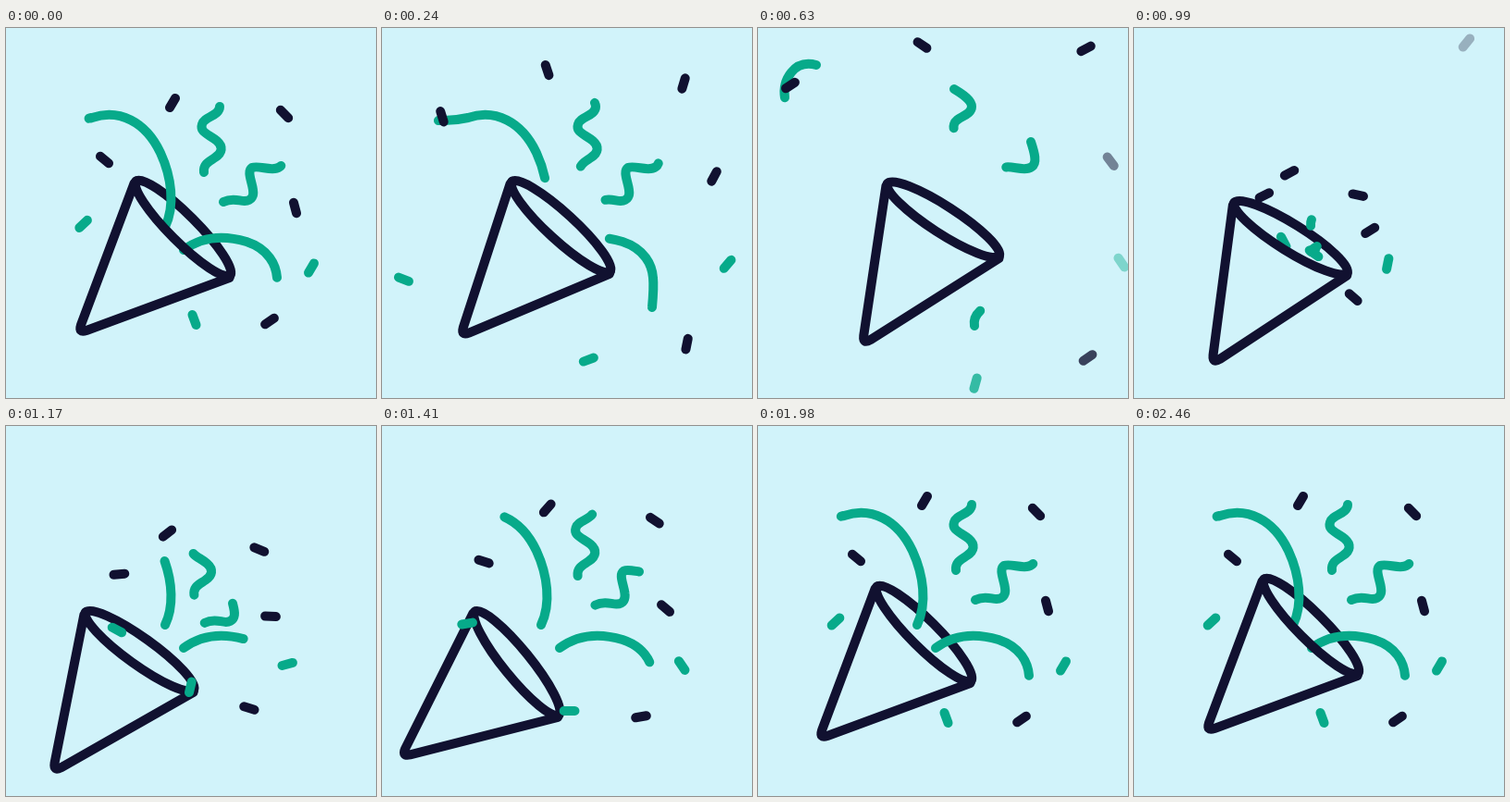
An HTML page with a canvas for the animation above (2490 ms loop, 400 by 400 pixels).

```html
<!DOCTYPE html>
<html lang="en">
<head>
<meta charset="utf-8">
<title>Party popper</title>
<style>
  html, body { margin: 0; width: 100%; height: 100%; overflow: hidden; background: #d1f3fa; }
  canvas { display: block; }
</style>
</head>
<body>
<canvas id="stage" width="400" height="400"></canvas>
<script>
const LOOP = 2490;
const BG = '#d1f3fa', NAVY = '#111130', GREEN = '#07aa8a';
const ctx = document.getElementById('stage').getContext('2d');
ctx.lineCap = ctx.lineJoin = 'round';
ctx.lineWidth = 10;

const clamp = v => Math.min(1, Math.max(0, v));
const cubicOut = u => 1 - (1 - clamp(u)) ** 3;
const rad = deg => deg * Math.PI / 180;

// Monotone cubic interpolation through [time, value] pairs
function track(times, values) {
  const n = times.length - 1;
  const slope = i => (values[i + 1] - values[i]) / (times[i + 1] - times[i]);
  const tangent = i => {
    if (i === 0 || i === n) return 0;
    const a = slope(i - 1), b = slope(i);
    return a * b <= 0 ? 0 : 2 * a * b / (a + b);
  };
  return t => {
    let i = 0;
    while (i < n - 1 && t >= times[i + 1]) i++;
    const h = times[i + 1] - times[i], u = clamp((t - times[i]) / h), w = 1 - u;
    return w * w * (1 + 2 * u) * values[i] + u * u * (3 - 2 * u) * values[i + 1]
      + h * u * w * (w * tangent(i) - u * tangent(i + 1));
  };
}

// Cone: swings back, recoils when it fires, then settles
const keys = [0, 240, 630, 885, 990, 1080, 1410, 1635, 1980, 2160, 2460];
const coneX = track(keys, [0, 4.5, 21.5, 23, -8, -28, -51, -39.6, -12, -6, 0]);
const coneY = track(keys, [0, 0.5, 1, 1, 21, 35, 34, 26.4, 8, 4, 0]);
const coneTurn = track(keys, [0, -2.5, -12.1, -13.1, -13.1, -13, 6, 3.5, 0, 0, 0]);
const backRim = new Path2D('M140.6 165.6A72 15 45 0 1 242.4 267.4');
const coneFront = new Path2D(
  'M242.4 267.4A72 15 45 0 1 140.6 165.6L138.5 168L81 321Q78 330 87 327L241.5 270Z');

function drawCone(shape, t) {
  ctx.save();
  ctx.translate(137 + coneX(t), 271 + coneY(t));
  ctx.rotate(rad(coneTurn(t)));
  ctx.translate(-137, -271);
  ctx.strokeStyle = NAVY;
  ctx.stroke(shape);
  ctx.restore();
}

// Confetti: resting pose, flight (dx, dy, spin, end time), burst offset (bx, by, spin)
const confetti = [
  [NAVY, 180, 81, -59, -2.6, -64.5, -90, 900, -12, 76, 31],
  [NAVY, 301, 93, 45, 58.4, -77, -276, 1062, -59, 88, -33],
  [NAVY, 106.5, 142.5, 40, -73.4, -82.6, -260, 880, 34.5, 38.5, -67],
  [NAVY, 312.5, 194.5, 75, 69, -50.5, -203, 750, -57.5, 24.5, -107],
  [NAVY, 285, 317, -34, 72.5, 40, -365, 820, -48, -26, 75],
  [GREEN, 84, 211.5, -43, -78.5, 78, -150, 620, 78, 19.5, 105],
  [GREEN, 330, 259.5, -60, 63, -6, -245, 730, -56, -4.5, -199],
  [GREEN, 203.5, 315.5, 70, 32, 69.5, -146, 815, -9, -72, -216],
];

function drawPiece(color, x, y, deg, alpha = 1) {
  const c = 5.9 * Math.cos(rad(deg)), s = 5.9 * Math.sin(rad(deg));
  ctx.globalAlpha = alpha;
  ctx.strokeStyle = color;
  ctx.beginPath();
  ctx.moveTo(x - c, y - s);
  ctx.lineTo(x + c, y + s);
  ctx.stroke();
  ctx.globalAlpha = 1;
}

// Share of the burst offset that is left; 1 at 990 ms
const burstLeft = t => Math.max(0, (1785 - t) / 795);

function drawConfetti(t) {
  for (const [color, x, y, deg, dx, dy, spin, end, bx, by, bSpin] of confetti) {
    if (t < end) {
      const start = Math.max(0, (end - 700) / 5);
      const e = cubicOut((t - start) / (end - start));
      drawPiece(color, x + dx * e, y + dy * e, deg + spin * e, clamp((end - t) / 240));
    }
    if (t >= 915) {
      const left = burstLeft(t), out = clamp((t - 900) / 90);
      const px = x + bx * left ** 3, py = y + by * left ** 3;
      drawPiece(color, 180 + (px - 180) * out, 228 + (py - 228) * out, deg + bSpin * left ** 1.5);
    }
  }
}

// Streamers slide along their path: away from rest first, later drawn anew
function streamer(d, opts) {
  const el = document.createElementNS('http://www.w3.org/2000/svg', 'path');
  el.setAttribute('d', d);
  return { shape: new Path2D(d), unit: el.getTotalLength() / opts.length, bx: 0, by: 0, ...opts };
}

const streamers = [
  streamer('M172 215C183 192 179 161 167 135C151 101 122 87 93 97C84 99 76 100 67 100C48 101 34 96 30 80C24 60 37 33 63 40',
    { length: 306, rest: 175, tail: 247, lead: 28, power: 1.6, start: 1000, grow: 1100 }),
  streamer('M192 240C215 223 240 225 260 231C284 239 292 256 293 270C294 280 293 291 292 302C288 327 265 285 241 305C235 310 233 316 234 322',
    { length: 236, rest: 125, tail: 217, lead: 32, power: 1.4, start: 975, grow: 860 }),
  streamer('M214 156C213 147 219 145 226 140C234 135 235 128 228 122C220 115 209 113 212 104C214 96 231 95 231 85C231 78 222 72 212 66',
    { length: 120, rest: 93, tail: 62, lead: 4, power: 2.4, start: 975, grow: 690, bx: -23, by: 58 }),
  streamer('M235 188C245 183 252 187 258 187C266 187 268 181 267 175C266 166 260 155 266 151C274 148 288 156 296 150C302 146 299 135 295 123',
    { length: 129, rest: 101, tail: 70, lead: 3, power: 2.4, start: 975, grow: 950, bx: -44, by: 54 }),
];

function drawStreamer(s, t) {
  const leaving = t < 900;
  const tail = leaving ? s.tail * (t / 630) ** s.power : 0;
  const head = leaving
    ? Math.min(s.length, s.rest + s.lead * (t / 240) ** s.power)
    : s.rest * cubicOut((t - s.start) / s.grow);
  if (head <= tail) return;
  const shift = leaving ? 0 : burstLeft(t) ** 3;
  ctx.save();
  ctx.translate(s.bx * shift, s.by * shift);
  ctx.strokeStyle = GREEN;
  ctx.setLineDash([(head - tail) * s.unit, 9999]);
  ctx.lineDashOffset = -tail * s.unit;
  ctx.stroke(s.shape);
  ctx.restore();
}

function draw(now) {
  const t = now % LOOP;
  const firing = t >= 900 && t < 1100;
  ctx.fillStyle = BG;
  ctx.fillRect(0, 0, 400, 400);
  drawCone(backRim, t);
  streamers.forEach(s => drawStreamer(s, t));
  if (firing) drawConfetti(t);
  drawCone(coneFront, t);
  if (!firing) drawConfetti(t);
}

const begin = performance.now();
function tick() {
  draw(performance.now() - begin);
  requestAnimationFrame(tick);
}
tick();
</script>
</body>
</html>
```
